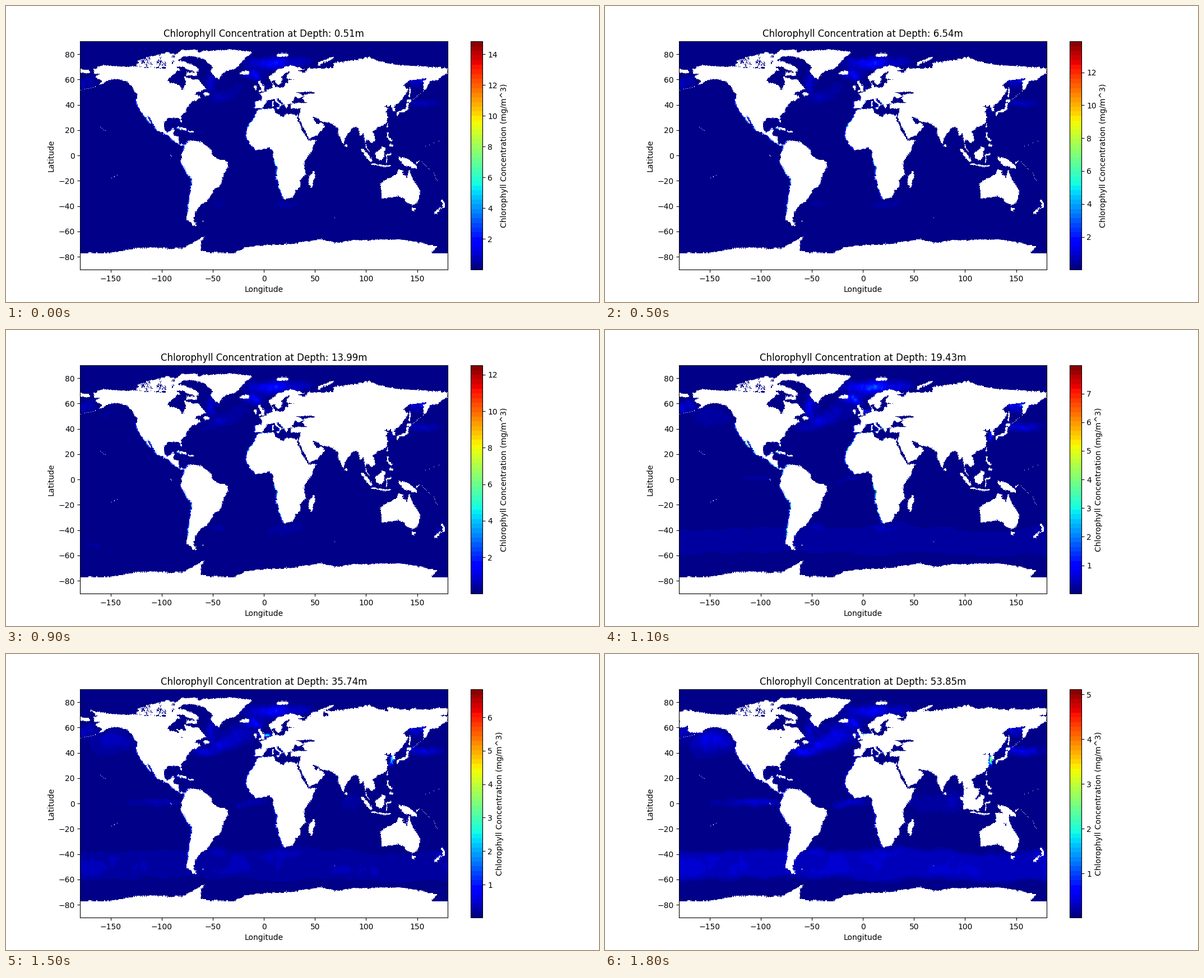
Recreate the animation shown at these times as a matplotlib script. Size 1058 by 529 pixels, loop 1.9 s.

```python
import numpy as np
import matplotlib.pyplot as plt
from matplotlib.animation import FuncAnimation
from matplotlib.colors import ListedColormap
from matplotlib.path import Path

DEPTHS = [0.51, 1.56, 2.67, 3.86, 5.14, 6.54, 8.09, 9.82, 11.77, 13.99,
          16.53, 19.43, 22.76, 26.56, 30.87, 35.74, 41.18, 47.21, 53.85]
PEAKS = np.interp(range(19), [0, 3, 7, 8, 9, 11, 12, 15, 18],
                  [14.83, 12.52, 15.23, 20.3, 12.5, 7.98, 8.1, 6.83, 5.11])
FLOOR = 0.018
BANDS = 49
NX, NY = 720, 360

rng = np.random.default_rng(4)
lon, lat = np.meshgrid((np.arange(NX) + 0.5) / 2 - 180,
                       (np.arange(NY) + 0.5) / 2 - 90)


def noise(power):
    """Periodic random field with unit spread; larger power is smoother."""
    kx, ky = np.meshgrid(np.fft.fftfreq(NX) * NX, np.fft.fftfreq(NY) * NX)
    k = np.maximum(np.hypot(kx, ky), 4)
    spectrum = np.fft.fft2(rng.standard_normal((NY, NX))) * k ** -power
    field = np.fft.ifft2(spectrum).real
    return (field - field.mean()) / field.std()


rough = noise(0.9)
swirl = noise(1.6)
drift_x, drift_y = noise(1.5), noise(1.5)
coast_x = lon + 0.4 * noise(0.8)
coast_y = lat + 0.32 * noise(0.8)
coast_points = np.column_stack([coast_x.ravel(), coast_y.ravel()])

# Depth of the sea floor in metres: zero on land, endless in open ocean.
floor = np.full((NY, NX), np.inf)


def inside(coords):
    corners = np.reshape(coords, (-1, 2))
    return Path(corners).contains_points(coast_points).reshape(NY, NX)


def land(*coords):
    floor[inside(coords)] = 0


def ridge(radius, *coords):
    """Long island around a bent line."""
    points = np.reshape(coords, (-1, 2))
    for (x0, y0), (x1, y1) in zip(points, points[1:]):
        dx, dy = x1 - x0, y1 - y0
        along = (coast_x - x0) * dx + (coast_y - y0) * dy
        t = np.clip(along / (dx * dx + dy * dy), 0, 1)
        gap = np.hypot(coast_x - x0 - t * dx, coast_y - y0 - t * dy)
        floor[gap < radius] = 0


def islets(x0, y0, x1, y1, count):
    for x, y in np.linspace((x0, y0), (x1, y1), count):
        floor[int((y + 90) * 2), int((x + 180) * 2)] = 0


def shelf(depth, west, east, south, north):
    """Shallow sea that runs dry as the level sinks."""
    area = (coast_x > west) & (coast_x < east)
    area &= (coast_y + drift_y > south) & (coast_y + drift_y < north)
    bottom = depth * (1 + 0.15 * swirl)
    floor[area] = np.minimum(floor, bottom)[area]


shelf(30, 112, 180, 69, 75)
shelf(42, -180, -155, 65, 72)
shelf(44, -180, -160, 60, 67)
shelf(44, -171, -157, 56, 61)
shelf(34, 43, 80, 67, 73)
shelf(40, 117, 123.5, 29, 41)
shelf(45, 1, 9, 51, 56)
shelf(42, 99, 114, -6, 12)
shelf(48, 130, 143, -16, -8)
shelf(44, 47, 55, 25, 31)
shelf(38, -95, -77, 51, 58)

# Ragged archipelago cut by winding straits.
arctic = inside([-125, 70, -124, 75, -95, 81.3, -87, 80, -82, 76, -80, 73.5,
                 -85, 70, -105, 69])
floor[arctic & (abs(noise(1.3)) > 0.22)] = 0
ridge(2.3, -87, 72, -78, 72, -66, 67.5)
ridge(1.4, -75, 64.5, -67, 64)
ridge(2.6, -84, 78.5, -80, 80.5, -67, 81)

# Americas.
land(-167, 68, -156.5, 71.2, -128, 70, -96, 68.3, -95, 72, -85, 69.5, -82, 67,
     -88, 64.2, -94.5, 59, -82.5, 55.2, -79.5, 51.4, -77, 56, -77.5, 62.3,
     -70, 60, -64.5, 60.3, -56, 52, -66, 50, -69, 45, -122, 45, -125, 49,
     -134, 58.3, -146, 60.8, -152, 59.5, -164, 54.6, -158, 58.5, -165.5, 62,
     -161, 64.2, -166.5, 65)
land(-69, 49, -62, 46, -65, 43.6, -70, 43, -75.5, 37, -76, 35, -81, 31.5,
     -80.3, 25.3, -84, 30, -94.5, 29.4, -97.5, 26, -97.5, 21, -95, 18.6,
     -91, 19, -90.5, 21, -87, 21.4, -88.5, 15.8, -83.5, 15, -83, 9, -77, 8.6,
     -80, 7.5, -85.7, 10, -94, 16, -105, 19.8, -113.5, 31.5, -114.7, 31.5,
     -109.6, 23, -115, 29, -120.6, 34.6, -124.3, 40.5, -124, 49)
land(-73, 78.3, -60, 82, -30, 83.6, -12, 81.5, -19, 76, -25, 70, -40, 65,
     -44, 60, -52, 65, -51, 70, -58, 75.7)
land(-77.5, 8.6, -72, 12, -62, 10.7, -51.5, 4.3, -50, 0, -44, -2.7,
     -35.2, -5.5, -35, -9, -39, -14, -41, -22, -48.5, -26, -53, -33.5,
     -57, -36.5, -62, -39, -65, -42, -67.5, -46, -69, -51, -65.5, -55,
     -69, -55.5, -75.5, -50, -73.7, -40, -70.3, -19, -76, -14, -81.3, -5,
     -80, 0.8, -77.5, 6)
ridge(1.3, -57.5, 48.5, -54.5, 48.5)
ridge(0.6, -84, 22.3, -76, 20.4)
ridge(0.8, -73, 18.8, -69.5, 18.7)

# Africa and Europe.
land(-6, 35.8, 10, 37.2, 10.5, 34, 19.5, 30.5, 22, 32.8, 34.4, 31.3,
     32.6, 29.8, 37.2, 20, 43.3, 12, 51.2, 11.8, 48, 4.5, 39.5, -4.5,
     40.7, -15, 35, -20, 35.4, -24, 32.5, -27, 28, -33, 20, -34.8, 18, -32,
     14.4, -22.5, 11.8, -17, 13.7, -11, 9, -1, 9.5, 4, 4.5, 6.3, -8, 4.4,
     -13, 8.5, -17, 14.7, -16.5, 21, -9.7, 30)
land(49.3, -12, 50.3, -15.5, 47, -25.3, 43.7, -24, 44.5, -17)
land(21, 54.5, 21.5, 57.5, 24, 57.2, 23.5, 59.2, 29.5, 60, 21.5, 61, 25, 65.5,
     22, 65.8, 17.2, 61.5, 18.5, 60, 16, 56.5, 13, 55.5, 11, 59, 7, 58, 5, 62,
     14, 68, 26, 71, 41, 67.3, 33, 66.6, 40, 64.6, 44, 68.3, 61, 69, 64, 50,
     22, 50)
land(-9, 43, -1.5, 43.5, -1, 46, -4.7, 48.4, 1.5, 50.5, 8.5, 53.8, 9.5, 57.5,
     11, 54, 22, 54.4, 39, 47, 33.5, 44.7, 31, 46.5, 28, 42, 29, 41,
     23.5, 40.5, 23, 36.6, 19.4, 41.5, 13.5, 45.5, 12.5, 44, 14, 42.5,
     18.4, 40, 16, 38, 15, 40.3, 10, 44, 3.2, 43, 0, 39, -2, 36.8, -9, 37)
ridge(1.5, -3.5, 57.3, -0.5, 52.3)
ridge(0.8, -4.5, 50.6, 0.5, 51.3)
ridge(1.4, -8, 53, -7.5, 54)
ridge(1.2, -22, 65, -15.5, 65)
ridge(1.2, 14, 79, 23, 79.3)
ridge(1, 54, 71.3, 57, 74, 67, 76.7)
ridge(0.7, 9, 39.5, 9, 42.5)
ridge(0.6, 13, 37.7, 15, 37.4)

# Asia.
land(58, 69, 68, 69, 68, 73, 87, 75, 104, 77.7, 113, 74, 130, 71.5, 160, 70,
     180, 69, 180, 65, 170, 60, 163, 59, 162, 56, 156.7, 51, 156, 57, 160, 61,
     143, 59.3, 135.5, 54.8, 141, 52, 135, 43.5, 128, 39.5, 129, 35.2,
     126.4, 34.5, 125, 39.5, 121.5, 39, 121, 40.8, 118, 39, 100, 35, 48, 42,
     50, 55)
land(118, 39, 122, 37, 119.3, 35, 122, 30, 119, 25, 110, 21.3, 106, 19,
     109, 12, 105, 9, 101, 13, 99.3, 10, 104, 1.4, 100.3, 6, 98.5, 13, 97, 17,
     94.3, 16, 91.8, 22.5, 87, 21.3, 80, 15, 78, 8.2, 73, 17, 72.5, 21,
     67, 25, 57, 26.8, 48, 30.3, 45, 38, 60, 50, 110, 45)
land(48, 30.3, 51, 25, 54, 24.2, 56.2, 26, 59.7, 22.3, 52, 15.7, 43.5, 12.7,
     42.5, 16, 35, 28, 34.3, 31.3, 36, 36.8, 27, 37, 26.5, 40, 32, 41.8,
     41.5, 41.3, 37.5, 45, 40, 48, 60, 50, 56, 30)
ridge(1.3, -180, 67, -172, 65.8)
ridge(0.9, 130.8, 32, 131.5, 34.2, 136.5, 35, 140, 36.5, 141, 40.5)
ridge(1.1, 141.3, 43, 143.8, 43.2)
ridge(0.7, 142.7, 46.5, 142.7, 53.5)
ridge(0.6, 120.6, 23, 121.3, 24.7)
ridge(0.8, 80.7, 7, 80.5, 8.5)
ridge(0.8, 121.2, 17.5, 121, 14.5, 124.5, 12)
ridge(1.1, 124, 7.5, 125.5, 7.5)
land(109, 1.5, 117, 7, 119, 5, 116, -4, 110, -3)
ridge(1.3, 96.5, 4.5, 101, -0.5, 104.7, -4.2)
ridge(0.6, 106, -6.7, 114, -8, 124, -8.5)
ridge(0.7, 120, -5, 120, 0.5, 124.5, 1)

# Oceania and Antarctica.
land(131, -1, 138, -1.7, 147, -6, 150.5, -10.5, 143, -9, 138, -8.3, 133, -4)
land(114, -22, 115.5, -34, 124, -33.5, 131, -31.5, 138, -34, 140, -38,
     147, -39, 150, -37.4, 153.3, -28, 146, -18.8, 142.5, -10.8, 140.5, -17.5,
     135.5, -15, 136, -12, 132, -11.3, 129.5, -15, 122, -18)
ridge(1.2, 146, -42, 147, -42.3)
ridge(1, 168, -45.5, 172.5, -42)
ridge(0.9, 174, -36, 176.5, -38.5, 175.3, -40.8)
ridge(0.5, 149, -6, 152, -4.6)
land(-180, -77, -150, -76.8, -126, -73.3, -100, -72.7, -78, -73, -67, -67.5,
     -56.5, -63, -62, -68, -61, -75, -52, -76.8, -30, -77, -19, -73, -5, -71,
     27, -69.7, 55, -66, 73, -69.5, 88, -66.6, 132, -66.1, 157, -69.5,
     170, -72, 164, -77, 164, -90, -180, -90)
floor[lat < -76.8] = 0

islets(-179.5, 51.4, -165, 54, 8)
islets(146, 44, 156, 50.5, 8)
islets(155, -5.5, 162, -11, 8)
islets(166.5, -14, 169.5, -20, 6)
islets(158, 7, 171, 11, 4)
islets(-160, 22, -155.5, 19.5, 4)
islets(-149, -17.6, -144, -16, 3)
islets(-91.3, 0, -90.3, -0.7, 3)
islets(69.3, -49.3, 70.2, -49, 2)
islets(-60.5, -51.8, -59, -51.6, 3)

warp_x, warp_y = lon + 2.5 * drift_x, lat + 1.1 * drift_y
texture = np.exp(0.33 * swirl + 0.12 * rough)
surface = 0.05 + np.zeros_like(lon)
deep = 0.06 + np.zeros_like(lon)


def bloom(x, y, half_width, half_height, near, far):
    """Patch with one strength near the surface and one at depth."""
    shape = texture * np.exp(-((warp_x - x) / half_width) ** 2
                             - ((warp_y - y) / half_height) ** 2)
    surface[:] += near * shape
    deep[:] += far * shape


bloom(12, 74, 26, 4.5, 1.4, .28)
bloom(-8, 65, 8, 3.5, 1.3, .3)
bloom(-55, 61, 6, 8, .9, .2)
bloom(-46, 47, 12, 6, .5, .3)
bloom(-24, 55, 16, 9, .3, .42)
bloom(-62, 41, 12, 4, .2, .6)
bloom(164, 41, 19, 4, .7, .4)
bloom(-176, 57, 9, 4, 1, .2)
bloom(151, 57, 8, 4, .9, .3)
bloom(162, 59.5, 5, 1.5, 3, .3)
bloom(-150, 48, 30, 9, .12, .26)
bloom(26, -37, 14, 4, .4, .25)
bloom(-46, -37, 8, 4, .45, .3)
bloom(-108, 0, 38, 3, .12, .36)
bloom(-12, 0, 18, 3, .12, .3)
bloom(165, -37, 12, 4, .2, .15)
bloom(75, 2, 30, 10, .02, .18)
bloom(91, 21.7, .8, .7, 14, .5)
bloom(4, 54.8, 5, 1.2, .5, 4)
bloom(123.8, 34.5, 1.7, 3, .5, 3)

belt = np.exp(-((warp_y + 49) / 11.5) ** 6) * np.exp(0.1 * swirl)

# Cool water wells up where land lies just to the east.
solid = floor == 0
east = np.roll(solid, -1, axis=1) | np.roll(solid, -2, axis=1)
upwelling = east & (abs(lat) > 4) & (abs(lat) < 45)
upwelling &= (lon < 20) & ((lon < -68) | (lon > -20))
surface += upwelling * 1.7 * np.exp(0.6 * rough)
deep += upwelling * 0.15


def chlorophyll(depth):
    fade = 1 / (1 + (depth / 27) ** 3)
    value = surface * fade + deep * (1 - fade) + (0.15 + 0.002 * depth) * belt
    return np.ma.masked_where(floor <= depth, value)


bands = ListedColormap(plt.get_cmap("jet")((np.arange(BANDS) + 0.5) / BANDS))
fig, ax = plt.subplots(figsize=(10.58, 5.29), dpi=100)
image = ax.imshow(chlorophyll(DEPTHS[0]), cmap=bands, origin="lower",
                  extent=(-180, 180, -90, 90), aspect="auto",
                  interpolation="nearest", vmin=FLOOR, vmax=PEAKS[0])
fig.colorbar(image, ax=ax, label="Chlorophyll Concentration (mg/m^3)")
ax.set_xlabel("Longitude")
ax.set_ylabel("Latitude")


def update(i):
    image.set_data(chlorophyll(DEPTHS[i]))
    image.set_clim(FLOOR, PEAKS[i])
    ax.set_title(f"Chlorophyll Concentration at Depth: {DEPTHS[i]:.2f}m")
    return []


anim = FuncAnimation(fig, update, frames=len(DEPTHS), interval=100, repeat=True)
plt.show()
```
